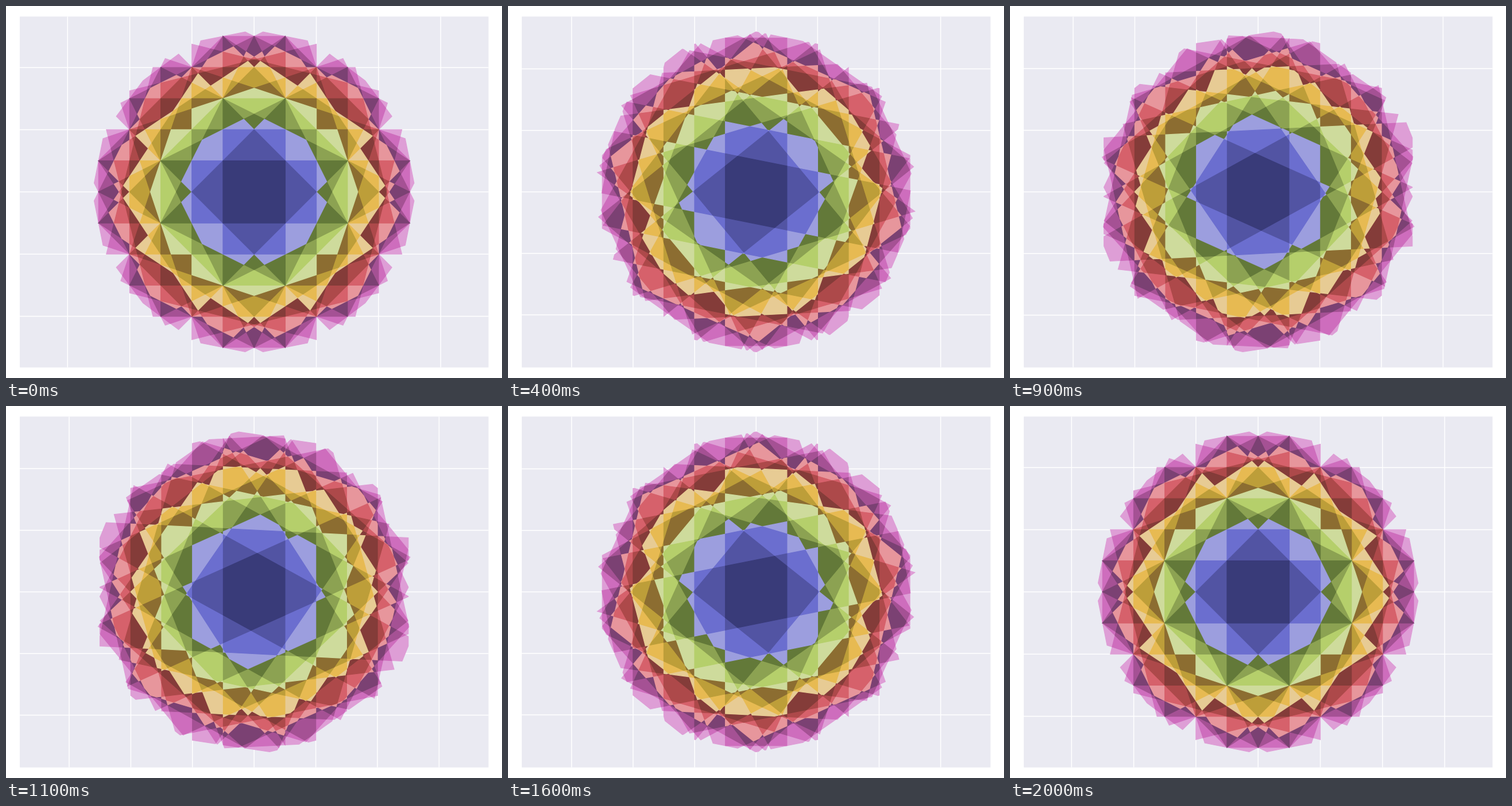
Recreate the animation shown at these times as an HTML page with a canvas. Size 864 px wide and 648 px high, loop 2100 ms.

```html
<!DOCTYPE html>
<html lang="en">
<head>
<meta charset="utf-8">
<title>Brillouin zones of a sheared lattice</title>
<style>
html, body { margin: 0; width: 100%; height: 100%; overflow: hidden; background: #fff; }
canvas { display: block; }
</style>
</head>
<body>
<canvas id="stage" width="864" height="648"></canvas>
<script>
const ctx = document.getElementById('stage').getContext('2d');
const COLORS = ('393b79 5254a3 6b6ecf 9c9ede 637939 8ca252 b5cf6b cedb9c 8c6d31 bd9e39 ' +
  'e7ba52 e7cb94 843c39 ad494a d6616b e7969c 7b4173 a55194 ce6dbd de9ed6')
  .split(' ').map(c => '#' + c);
const STEPS = 20, STEP_MS = 100;
const CX = 432.2, CY = 323.8, HALF_HEIGHT = 278.57;
const BOX = { left: 24, top: 18.4, right: 840.5, bottom: 629.6 };
const MAX_R = 3, EPS = 1e-7;

// Bisector of each lattice vector (x, y): x*px + y*py = h
function bisectors(shear) {
  const list = [];
  for (let n = -6; n <= 6; n++) {
    for (let m = -12; m <= 12; m++) {
      const x = m + shear * n, y = n, h = (x * x + y * y) / 2;
      if (h > 0 && h < MAX_R * MAX_R * 2) list.push({ x, y, h });
    }
  }
  return list;
}

// Outline of the union of zones 1..k, for every k
function zoneOutlines(shear) {
  const lines = bisectors(shear);
  const outlines = COLORS.map(() => []);
  const seen = new Set();
  lines.forEach((a, i) => {
    for (const b of lines.slice(i + 1)) {
      const det = a.x * b.y - a.y * b.x;
      if (Math.abs(det) < EPS) continue;
      const x = (a.h * b.y - b.h * a.y) / det;
      const y = (a.x * b.h - b.x * a.h) / det;
      if (Math.hypot(x, y) > MAX_R) continue;
      const key = `${Math.round(x * 1e6)},${Math.round(y * 1e6)}`;
      if (seen.has(key)) continue;
      seen.add(key);
      let crossed = 0, touching = 0;
      for (const l of lines) {
        const d = l.x * x + l.y * y - l.h;
        if (d > EPS) crossed++;
        else if (d > -EPS) touching++;
      }
      for (let k = crossed; k < crossed + touching && k < COLORS.length; k++) {
        outlines[k].push({ x, y, angle: Math.atan2(y, x) });
      }
    }
  });
  outlines.forEach(o => o.sort((p, q) => p.angle - q.angle));
  return outlines;
}

const cache = [];
const outlinesAt = step => cache[step] ??= zoneOutlines(step / STEPS);

function drawGrid(scale) {
  const { left, top, right, bottom } = BOX;
  ctx.fillStyle = '#eaeaf2';
  ctx.fillRect(left, top, right - left, bottom - top);
  ctx.strokeStyle = '#fff';
  ctx.lineWidth = 1.5;
  ctx.beginPath();
  for (let i = -3; i <= 3; i++) {
    const x = CX + i * scale, y = CY + i * scale;
    ctx.moveTo(x, top);
    ctx.lineTo(x, bottom);
    if (Math.abs(i) < 3) {
      ctx.moveTo(left, y);
      ctx.lineTo(right, y);
    }
  }
  ctx.stroke();
}

function draw(step) {
  const outlines = outlinesAt(step);
  const scale = HALF_HEIGHT / Math.max(...outlines.at(-1).map(p => p.y));
  ctx.fillStyle = '#fff';
  ctx.fillRect(0, 0, 864, 648);
  drawGrid(scale);
  ctx.lineWidth = 1.35;
  for (let k = COLORS.length - 1; k >= 0; k--) {
    ctx.fillStyle = ctx.strokeStyle = COLORS[k];
    ctx.beginPath();
    for (const p of outlines[k]) ctx.lineTo(CX + p.x * scale, CY - p.y * scale);
    ctx.closePath();
    ctx.fill();
    ctx.stroke();
  }
}

for (let s = 0; s <= STEPS; s++) outlinesAt(s);
const start = performance.now();
let shown = -1;

function tick() {
  const step = Math.floor((performance.now() - start) / STEP_MS) % (STEPS + 1);
  if (step !== shown) draw(shown = step);
  requestAnimationFrame(tick);
}
tick();
</script>
</body>
</html>
```
